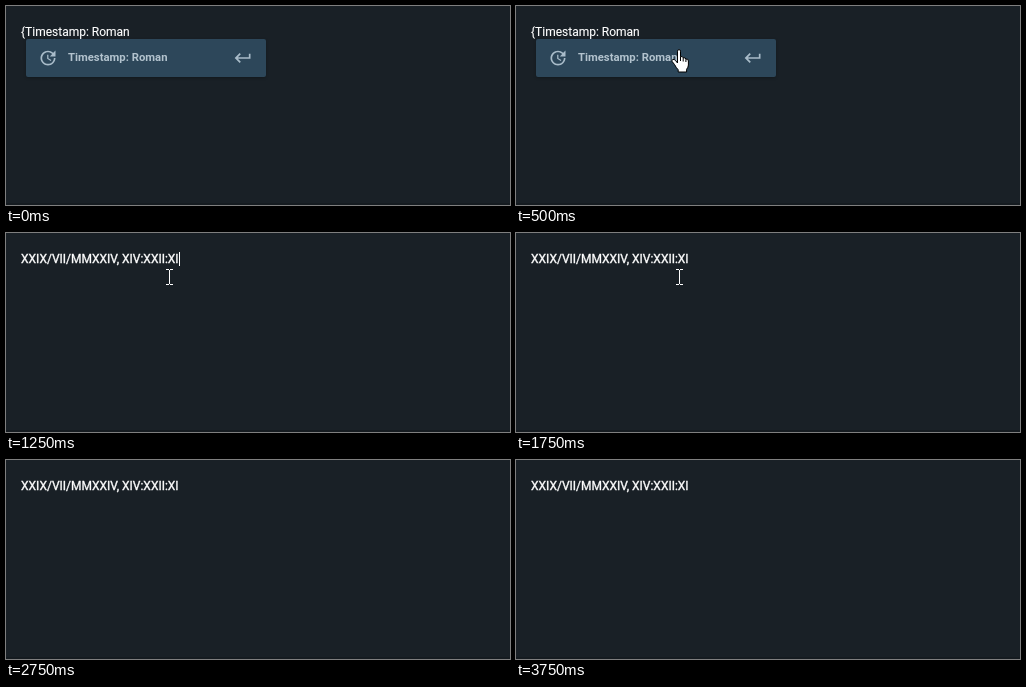
Write an HTML page that moves like this. It is 504x199 px and loops after 4 s.

```html
<!DOCTYPE html>
<html lang="en">
<head>
<meta charset="utf-8">
<title>Timestamp snippet</title>
<style>
  html, body { margin: 0; width: 100%; height: 100%; overflow: hidden; background: #192026; }
  .stage { position: relative; width: 504px; height: 199px; overflow: hidden; background: #192026; }
  .stage * { position: absolute; }
  .edge { left: 0; top: 197px; width: 504px; height: 2px; background: #151b20; }
  .scene, .caret, .beam, .hand { animation: 4s step-end infinite; }

  .line {
    left: 15px; top: 19px; font: 12px/14px Roboto, sans-serif;
    color: #fff; white-space: pre; -webkit-text-stroke: .15px;
  }
  .result .line { -webkit-text-stroke-width: .35px; }
  .menu {
    left: 20px; top: 33px; width: 240px; height: 38px; border-radius: 2px;
    background: #2d475a; box-shadow: 0 1px 3px rgba(0, 0, 0, .25);
  }
  .label {
    left: 42px; top: 12px; font: 700 11.3px/14px Roboto, sans-serif;
    color: #b3c3ce; white-space: pre;
  }
  .menu svg { top: 9px; width: 20px; height: 20px; fill: #a9bcc9; }
  .select { left: 16px; top: 17px; width: 112px; height: 18px; background: #2b3f4e; }
  .busy .line { color: #70767a; }
  .dots { left: 0; top: 0; fill: #fff; }

  .caret { left: 173px; top: 19px; width: 1px; height: 14px; background: #fff; animation-name: blink; }
  .busy .mark { left: 128px; top: 19px; width: 1px; height: 14px; background: #fff; }
  .beam { left: 0; top: 0; animation-name: beam; }
  .hand { left: 155px; top: 43px; animation-name: hand; }

  .prompt { animation-name: prompt; }
  .busy { animation-name: busy; }
  .result { animation-name: result; }

  @keyframes prompt { 0% { opacity: 1 } 25%, 100% { opacity: 0 } }
  @keyframes busy { 0% { opacity: 0 } 25% { opacity: 1 } 31.25%, 100% { opacity: 0 } }
  @keyframes result { 0% { opacity: 0 } 31.25%, 100% { opacity: 1 } }
  @keyframes hand { 0% { opacity: 0 } 12.5% { opacity: 1 } 25%, 100% { opacity: 0 } }
  @keyframes blink {
    0% { opacity: 0 }
    31.25% { opacity: 1 } 43.75% { opacity: 0 }
    56.25% { opacity: 1 } 68.75% { opacity: 0 }
    81.25% { opacity: 1 } 93.75%, 100% { opacity: 0 }
  }
  @keyframes beam {
    0% { opacity: 0; transform: translate(259px, 105px) }
    6.25% { opacity: 1; transform: translate(259px, 105px) }
    12.5% { opacity: 0; transform: translate(160px, 36px) }
    25% { opacity: 1; transform: translate(160px, 36px) }
    50% { opacity: 1; transform: translate(175px, 45px) }
    56.25% { opacity: 1; transform: translate(376px, 157px) }
    62.5% { opacity: 1; transform: translate(418px, 180px) }
    68.75%, 100% { opacity: 0; transform: translate(418px, 180px) }
  }
</style>
</head>
<body>
<div class="stage">
  <div class="edge"></div>

  <div class="scene prompt">
    <div class="line">{Timestamp: Roman</div>
    <div class="menu">
      <svg style="left:12px" viewBox="0 0 24 24"><path d="M21 10.12h-6.78l2.74-2.82c-2.73-2.7-7.15-2.8-9.88-.1-2.73 2.71-2.73 7.08 0 9.79s7.15 2.71 9.88 0C18.32 15.65 19 14.08 19 12.1h2c0 1.98-.88 4.55-2.64 6.29-3.51 3.48-9.21 3.48-12.72 0-3.5-3.47-3.53-9.11-.02-12.58s9.14-3.47 12.65 0L21 3zM12.5 8v4.25l3.5 2.08-.72 1.21L11 13V8z"/></svg>
      <div class="label">Timestamp: Roman</div>
      <svg style="left:207px" viewBox="0 0 24 24"><path d="M19 7v4H5.83l3.58-3.59L8 6l-6 6 6 6 1.41-1.41L5.83 13H21V7z"/></svg>
    </div>
  </div>

  <div class="scene busy">
    <div class="select"></div>
    <div class="line">{Timestamp: Roman}</div>
    <svg class="dots" width="60" height="40">
      <circle cx="17" cy="26.5" r=".8"/>
      <circle cx="27.5" cy="26.5" r="1.7"/>
      <circle cx="33.5" cy="26.5" r="1.7"/>
      <circle cx="39.5" cy="26.5" r="1.7"/>
    </svg>
    <div class="mark"></div>
  </div>

  <div class="scene result">
    <div class="line">XXIX/VII/MMXXIV, XIV:XXII:XI</div>
  </div>
  <div class="caret"></div>

  <svg class="beam" width="7" height="16" fill="#fff" shape-rendering="crispEdges">
    <path d="M0 0h3v1H0zM4 0h3v1H4zM3 1h1v14H3zM0 15h3v1H0zM4 15h3v1H4z"/>
  </svg>
  <svg class="hand" width="18" height="24" fill="#fff" stroke="#000" stroke-linejoin="round">
    <path d="M6.5 14V2.2Q6.5.6 8 .6T9.5 2.2V7.6Q11.8 7 12.2 8.9 14.5 8.2 14.9 10.1 17.4 9.5 17.4 12V16Q17.2 18.5 15.6 20.3V23H7.2V20.8Q5 18.5 3.6 15.6L1.2 12.6Q.5 11 1.8 10.5T4.4 11.4Z"/>
    <path d="M9.5 7.6V12M12.2 8.9V12.5M14.9 10.1V13" fill="none"/>
  </svg>
</div>
</body>
</html>
```
